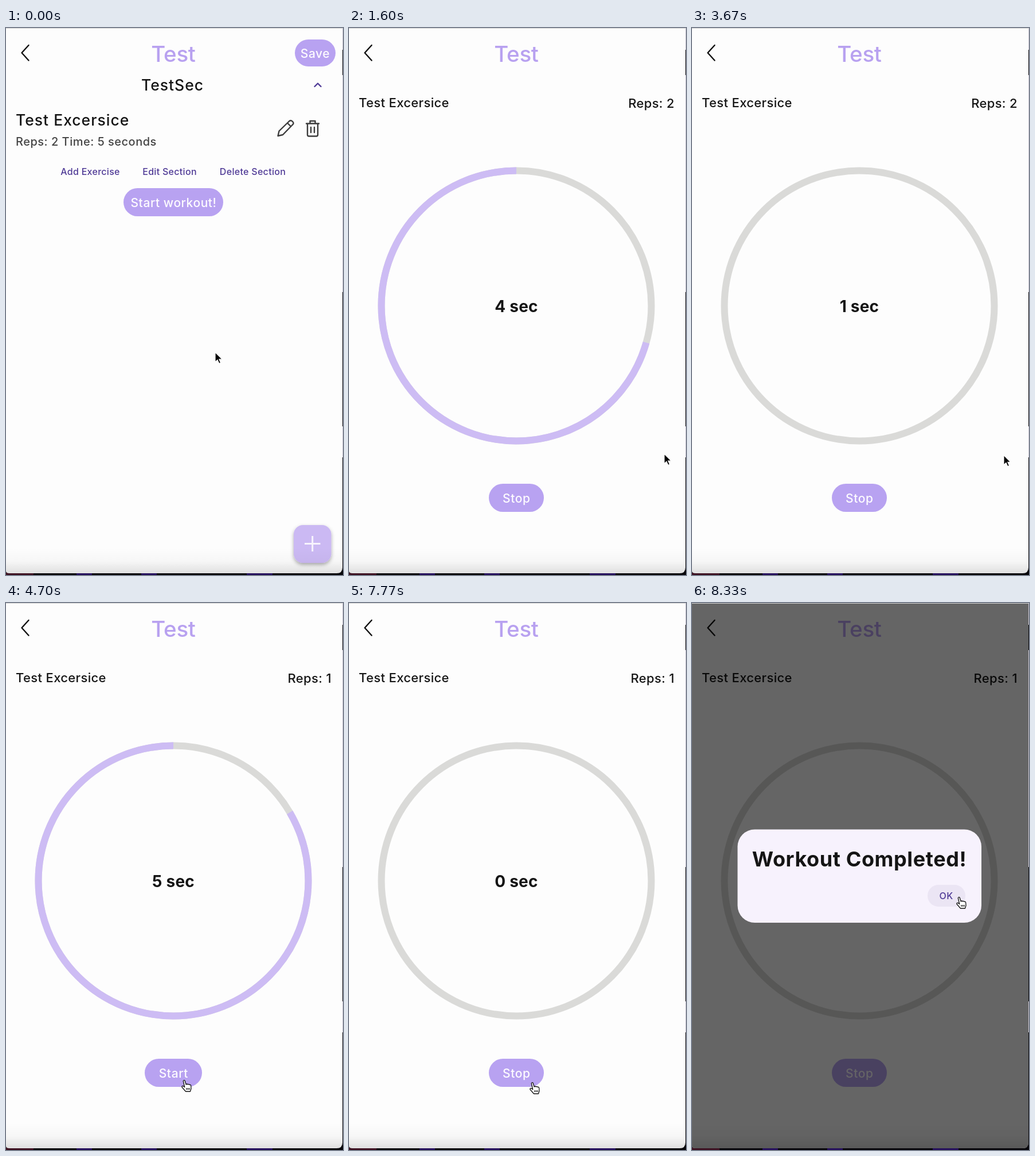
Animation of 588x953 px, one loop 8360 ms. Source, as an HTML page:

```html
<!DOCTYPE html>
<html lang="en">
<head>
<meta charset="utf-8">
<title>Workout timer</title>
<style>
  html, body { margin: 0; width: 100%; height: 100%; overflow: hidden; background: #000; }
  svg { display: block; width: 588px; height: 953px; }
  text { font: 500 21px Inter, "Open Sans", sans-serif; letter-spacing: .55px; fill: #151515; }
  .mid { text-anchor: middle; }
  .end { text-anchor: end; }
  .title { font-size: 38.5px; letter-spacing: -.3px; fill: #b8a1f0; }
  .head { font-size: 26.5px; letter-spacing: 1px; }
  .sub { font-size: 20px; letter-spacing: .5px; fill: #444; }
  .link { font-size: 16px; letter-spacing: .3px; fill: #4f3a96; }
  .info { font-size: 22px; letter-spacing: .35px; }
  .bold { font-size: 28px; font-weight: 700; letter-spacing: .2px; }
  .big { font-size: 36px; letter-spacing: .6px; }
  .on { fill: #fdfbff; }
  .pill { fill: #b8a2f1; }
  .line { fill: none; stroke: #3c3c3c; stroke-width: 2.4; stroke-linecap: round; stroke-linejoin: round; }
  .ring { fill: none; stroke-width: 12; }
</style>
</head>
<body>
<svg viewBox="0 0 588 953">
  <defs>
    <linearGradient id="shade" x2="0" y2="1">
      <stop offset="0" stop-opacity="0"/>
      <stop offset=".5" stop-opacity=".025"/>
      <stop offset="1" stop-opacity=".13"/>
    </linearGradient>
    <filter id="soft" x="-30%" y="-30%" width="160%" height="160%">
      <feDropShadow dx="0" dy="3" stdDeviation="3" flood-opacity=".32"/>
    </filter>
    <clipPath id="window"><path d="M0 0H587V940Q587 950 577 950H6Q0 950 0 946Z"/></clipPath>
  </defs>

  <!-- desktop behind the window -->
  <path d="M0 0H588V953H0Z" fill="#08070c"/>
  <path d="M586 0h2v38h-2zM586 82h2v378h-2zM586 694h2v54h-2z" fill="#c9c6d2"/>
  <path d="M0 949h48v4H0z" fill="#3d1222"/>
  <path d="M123 949h27v4h-27zM236 949h27v4h-27zM420 949h45v4h-45z" fill="#25105c"/>

  <g clip-path="url(#window)">
    <path d="M0 0H588V953H0Z" fill="#fdfdfd"/>
    <path class="line" d="M39.5 30 27.500 43.300 39.5 56.500" style="stroke:#111"/>
    <text class="mid title" x="292" y="58.500">Test</text>

    <g id="list">
      <rect class="pill" x="504" y="20" width="71" height="47" rx="23.5"/>
      <text class="mid on" x="539.500" y="52">Save</text>
      <text class="mid head" x="290.500" y="109">TestSec</text>
      <path class="line" d="M538.5 102 544 96.500 549.500 102" style="stroke:#4f3a96"/>
      <text class="head" x="17" y="170">Test Excersice</text>
      <text class="sub" x="17" y="205">Reps: 2 Time: 5 seconds</text>
      <path class="line" d="M474.500 188 476.500 179.500 494 162.500Q497 160 500 163T500 168.500L483 186ZM491 165.500 497 171.500"/>
      <path class="line" d="M524 166.500H546M530.500 166V162H539.500V166M526 167V186Q526 188.500 528.500 188.500H541.500Q544 188.500 544 186V167M532 173V182M538 173V182"/>
      <text class="mid link" x="147" y="255.500">Add Exercise</text>
      <text class="mid link" x="285.500" y="255.500">Edit Section</text>
      <text class="mid link" x="430.500" y="255.500">Delete Section</text>
      <rect class="pill" x="205" y="279" width="174" height="49" rx="24.5"/>
      <text class="mid on" x="292.500" y="312">Start workout!</text>
      <rect x="502" y="866" width="65.500" height="66" rx="16" fill="#cbb9f3" filter="url(#soft)"/>
      <path d="M521 898.500H548.500M534.700 885V912" stroke="#f7f3fd" stroke-width="3"/>
    </g>

    <g id="timer">
      <text class="info" x="17" y="138">Test Excersice</text>
      <text class="end info" id="reps" x="568" y="139"></text>
      <circle class="ring" cx="292" cy="484" r="235.500" stroke="#dadad8"/>
      <circle class="ring" id="arc" cx="292" cy="484" r="235.500" stroke="#cdbcf4" pathLength="100" transform="rotate(-90 292 484)"/>
      <text class="mid bold" id="secs" x="292" y="495"></text>
      <rect class="pill" id="pill" y="794" height="49" rx="24.5"/>
      <text class="mid on" id="label" x="292.300" y="827"></text>
    </g>

    <path d="M0 905H588V953H0Z" fill="url(#shade)"/>

    <g id="dialog">
      <path d="M0 0H588V953H0Z" fill-opacity=".6"/>
      <rect x="79.500" y="394.500" width="425.500" height="162.500" rx="30" fill="#f7f2fd"/>
      <text class="mid bold big" x="292" y="458.500">Workout Completed!</text>
      <rect id="hover" x="411" y="491" width="66" height="38" rx="19" fill="#ebe5f4"/>
      <text class="mid link" x="443.500" y="516">OK</text>
    </g>
    <path d="M0 .5H588" stroke="#d2d2d2"/>
  </g>

  <g id="cursor">
    <path id="arrow" d="M0 0V17L4 13.300 6.800 19.500 9.600 18.300 6.900 12.200H12.200Z" stroke="#fff" stroke-width="1.2"/>
    <path id="hand" d="M-1.700 1Q-1 -1.500 1 0L3.200 7Q5 5 6.300 7Q8 5.500 9.200 7.500Q11.500 6.500 11.700 9.500L12 14 10.500 19H2.500L-4 11.500Q-4.500 9 -2 9.500L.7 11.500ZM4 13V16M6.500 13V16M9 13V16"
      fill="#fff" stroke="#111" stroke-width="1.3" stroke-linejoin="round"/>
  </g>
</svg>

<script>
const LOOP = 8360, OPEN = 400;
// the seconds count on one steady clock: 5 to 0, twice
const COUNT = 780, TICK = 583, DONE = COUNT + 12 * TICK;
// the ring empties faster than the seconds run out
const RINGS = [818, 4260], RUN = 2664;

// cursor stops: time, x, y
const stops = [
  [0, 365, 565], [60, 365, 565], [320, 300, 306], [410, 300, 306],
  [700, 331, 825], [900, 331, 825], [1400, 550, 742], [3600, 550, 742],
  [4350, 311, 832], [4850, 311, 832], [5450, 472, 814], [6900, 472, 814],
  [7450, 320, 836], [7880, 320, 836], [8230, 466, 513], [LOOP, 466, 513]
];

const $ = id => document.getElementById(id);
const clamp = (v, lo = 0, hi = 1) => Math.min(hi, Math.max(lo, v));
const show = (id, amount) => $(id).style.opacity = +amount;

function cursorAt(t) {
  const i = stops.findIndex(s => s[0] > t);
  const [t0, x0, y0] = stops[i - 1], [t1, x1, y1] = stops[i];
  const u = (t - t0) / (t1 - t0), k = u * u * (3 - 2 * u);
  return [x0 + (x1 - x0) * k, y0 + (y1 - y0) * k];
}

function draw(t) {
  const ticks = clamp(Math.floor((t - COUNT) / TICK), 0, 11);
  const seconds = 5 - ticks % 6;
  const running = seconds < 5;
  const width = running ? 96 : 100;
  const elapsed = 100 * clamp((t - RINGS[+(t >= RINGS[1])]) / RUN);

  const fade = clamp((t - OPEN) / 120);
  show('list', 1 - fade);
  show('timer', fade);
  show('dialog', clamp((t - DONE) / 80));

  $('reps').textContent = 'Reps: ' + (ticks < 6 ? 2 : 1);
  $('secs').textContent = seconds + ' sec';
  $('label').textContent = running ? 'Stop' : 'Start';
  $('pill').setAttribute('x', 292 - width / 2);
  $('pill').setAttribute('width', width);
  $('arc').style.visibility = elapsed < 100 ? 'visible' : 'hidden';
  $('arc').setAttribute('stroke-dasharray', elapsed ? `0 ${elapsed} ${100 - elapsed} 0` : 'none');

  const [x, y] = cursorAt(t);
  const over = (l, top, r, b) => x > l && x < r && y > top && y < b;
  const onOk = t >= DONE && over(411, 491, 477, 529);
  const hand = onOk
    || t < OPEN && over(205, 279, 379, 328)
    || t >= OPEN && t < DONE && over(242, 794, 342, 843);
  show('hover', onOk);
  show('hand', hand);
  show('arrow', !hand);
  $('cursor').setAttribute('transform', `translate(${x} ${y})`);
}

const begin = performance.now();
function frame() {
  draw((performance.now() - begin) % LOOP);
  requestAnimationFrame(frame);
}
frame();
</script>
</body>
</html>
```
